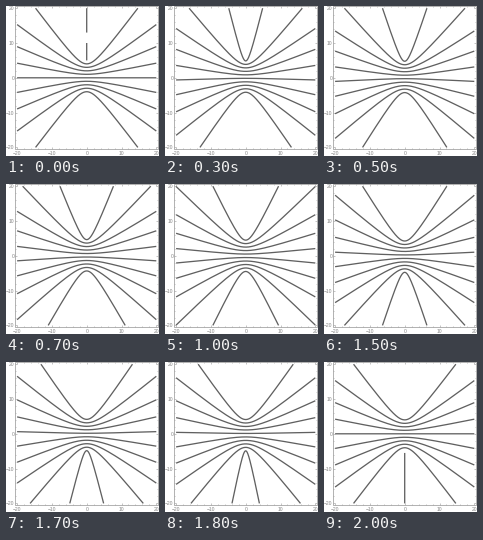
Recreate the animation shown at these times as a matplotlib script. Size 153 by 150 pixels, loop 2100 ms.

```python
import numpy as np
import matplotlib.pyplot as plt
from matplotlib.animation import FuncAnimation

W, H, DPI = 153, 150, 100
CX, CY, SCALE = 80.7, 71.8, 3.48  # plot centre and pixels per unit
FOCUS, REACH, EDGE = 5, 20, 20.55
STEPS = 21
GREY = "#a0a0a0"
PT = 72 / DPI                     # one pixel in points

plt.rcParams["toolbar"] = "None"
fig = plt.figure(figsize=(W / DPI, H / DPI), dpi=DPI, facecolor="white")
ax = fig.add_axes([0, 0, 1, 1])
ax.set_xlim(0, W)
ax.set_ylim(H, 0)
ax.axis("off")


def px(x):
    return CX + SCALE * x


def py(y):
    return CY - SCALE * y


def segment(xs, ys, width=0.6):
    ax.plot(xs, ys, color=GREY, lw=width * PT, solid_capstyle="butt")


def draw_frame():
    left, right = px(-EDGE), px(EDGE)
    top, bottom = py(EDGE), py(-EDGE)
    segment([left, right, right, left, left], [top, top, bottom, bottom, top], 0.8)
    for v in range(-REACH, REACH + 1, 2):
        n = 2.0 if v % 10 == 0 else 1.1
        for edge, d in ((left, n), (right, -n)):
            segment([edge, edge + d], [py(v)] * 2)
        for edge, d in ((top, n), (bottom, -n)):
            segment([px(v)] * 2, [edge, edge + d])
    style = dict(family="Liberation Sans", size=5 * PT, color="#858585")
    for v in range(-REACH, REACH + 1, 10):
        label = str(v).replace("-", "\u2212")
        ax.text(left - 0.8, py(v), label, ha="right", va="center_baseline", **style)
        ax.text(px(v), bottom + 5.6, label, ha="center", va="baseline", **style)


def streamline(s):
    """Confocal hyperbola branch through (0, s), kept inside the plot range."""
    if abs(s) < 1e-9:
        return np.array([-REACH, REACH]), np.zeros(2)
    if s > FOCUS - 1e-9:
        # the degenerate upper branch is broken in the middle
        return np.zeros(5), np.array([REACH, 13, np.nan, 10, FOCUS])
    if s < -FOCUS + 1e-9:
        return np.zeros(2), np.array([-5.5, -REACH])
    b = np.sqrt(FOCUS**2 - s**2)
    u = min(np.arcsinh(REACH / b), np.arccosh(REACH / abs(s)))
    u = np.linspace(-u, u, 161)
    return b * np.sinh(u), s * np.cosh(u)


draw_frame()
lines = [ax.plot([], [], color="#606060", lw=1.3 * PT, solid_capstyle="butt",
                 snap=False)[0] for _ in range(10)]


def update(i):
    shift = i / (STEPS - 1)
    for k, line in enumerate(lines, start=-4):
        x, y = streamline(k - shift)
        line.set_data(px(x), py(y))
    return lines


anim = FuncAnimation(fig, update, frames=STEPS, interval=100, repeat=True,
                     repeat_delay=0, blit=False)
plt.show()
```
